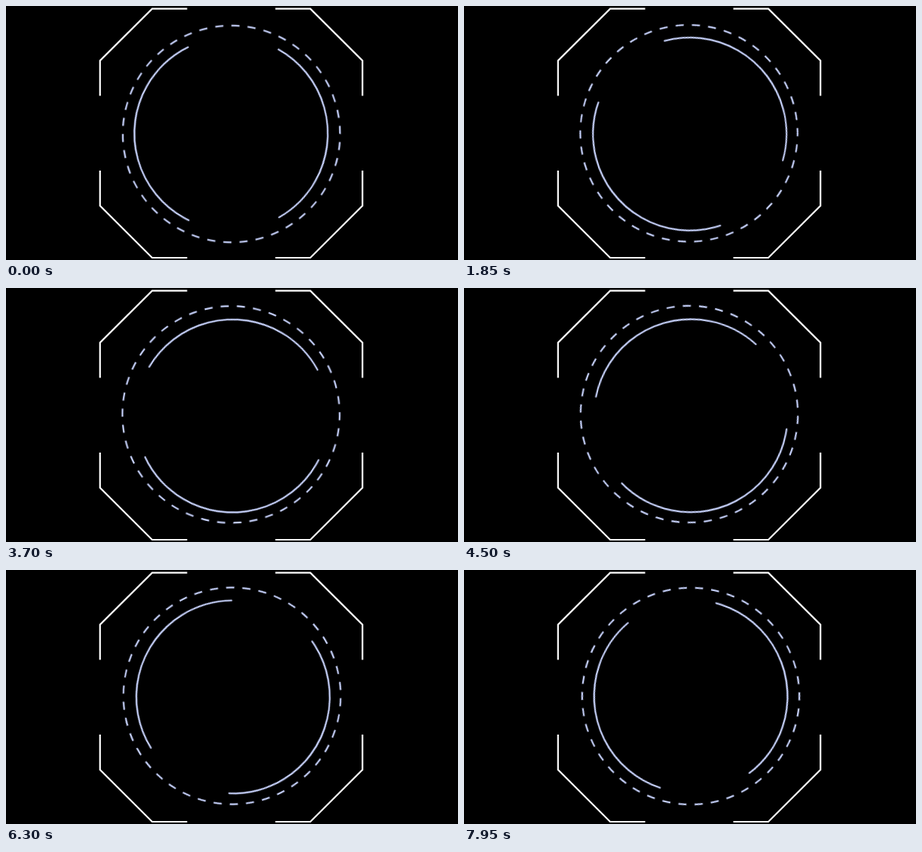
Write an HTML page that moves like this. It is 600 px wide and 338 px high and loops after 8 s.

```html
<!DOCTYPE html>
<html lang="en">
<head>
<meta charset="utf-8">
<title>Rotating rings</title>
<style>
  html, body {
    margin: 0;
    width: 100%;
    height: 100%;
    overflow: hidden;
    background: #000;
  }
  svg {
    display: block;
    width: 100%;
    height: 100%;
    fill: none;
    stroke-width: 2.2;
  }
  .frame { stroke: #fff; }
  .ring {
    stroke: #cad5ff;
    transform-origin: 300px 169px;
    animation: spin 8s steps(160) infinite;
  }
  .dashes { --turn: 192deg; }
  .arcs {
    --turn: -192deg;
    stroke-linecap: round;
  }
  @keyframes spin {
    to { transform: rotate(var(--turn)); }
  }
</style>
</head>
<body>
<svg viewBox="0 0 600 338">
  <defs>
    <path id="corner" d="M-58.5 -165.7H-105L-174.2 -96.5V-49.8"/>
  </defs>
  <g class="frame" transform="translate(299 169.3)">
    <use href="#corner"/>
    <use href="#corner" transform="scale(-1 1)"/>
    <use href="#corner" transform="scale(1 -1)"/>
    <use href="#corner" transform="scale(-1 -1)"/>
  </g>
  <!-- Both rings sit slightly off the pivot, so they wobble as they turn. -->
  <g class="ring dashes">
    <!-- 42 equal dashes and gaps, starting at the bottom -->
    <circle r="144.2" pathLength="84" stroke-dasharray="1"
            transform="translate(299.25 170.3) rotate(90)"/>
  </g>
  <g class="ring arcs">
    <circle r="128.4" pathLength="360" stroke-dasharray="121 55.7 127.5 55.8"
            transform="translate(298.8 169.7) rotate(-60.7)"/>
  </g>
</svg>
</body>
</html>
```
